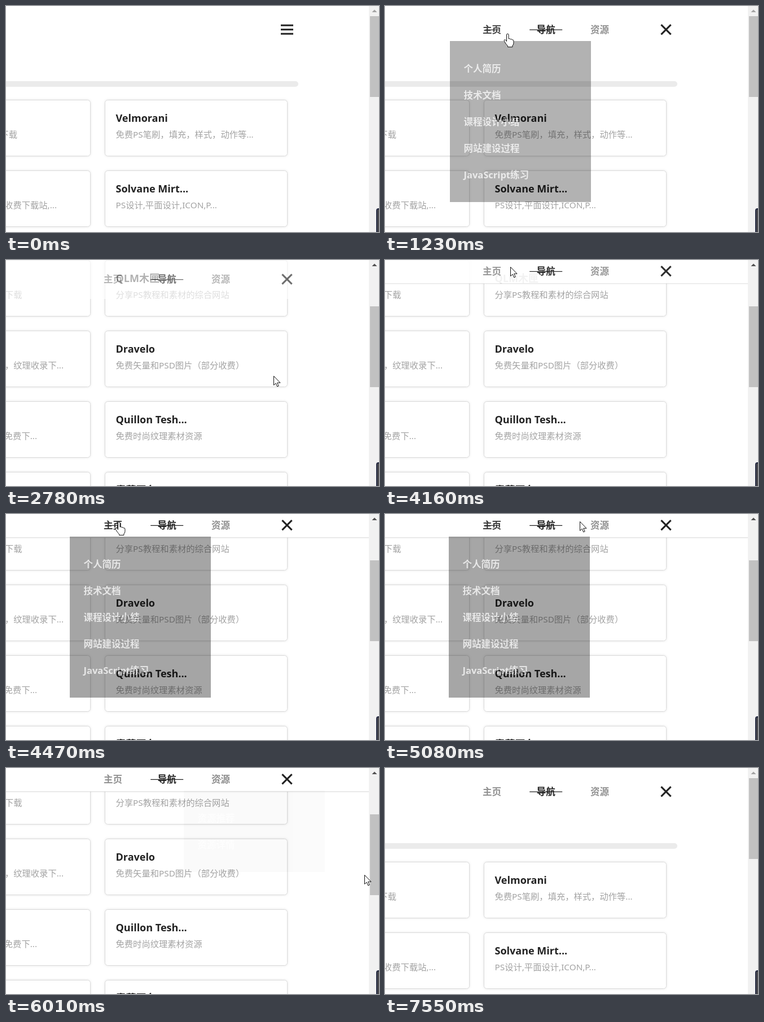
An HTML page for the animation above (8180 ms loop, 661 px wide and 400 px high).

```html
<!DOCTYPE html>
<html lang="zh-CN">
<head>
<meta charset="utf-8">
<style>
  html, body { margin: 0; width: 100%; height: 100%; overflow: hidden; background: #fff; }
  svg { display: block; font-family: "Noto Sans", "Noto Sans CJK SC", "Noto Sans CJK", sans-serif; }
  .card { fill: #fff; stroke: #dadada; filter: drop-shadow(0 0 2px rgba(0, 0, 0, .1)); }
  .title { font-size: 18px; font-weight: 700; fill: #222; }
  .desc { font-size: 15.3px; fill: #a3a3a3; }
  .nav, .menu text { font-size: 16.5px; font-weight: 700; }
  .nav { text-anchor: middle; }
  #bars path { stroke: #222; stroke-width: 3; }
  .line { stroke: #222; stroke-width: 1.2; }
  #cursor path { fill: #fff; stroke: #111; stroke-linejoin: round; }
</style>
</head>
<body>
<svg id="stage" width="661" height="400" viewBox="0 0 661 400">
  <g id="page"><rect x="-20" y="133" width="538" height="10" rx="5" fill="#ebebeb"/></g>
  <g id="header">
    <rect id="bg" width="643" fill="#fff"/>
    <g id="edge">
      <path d="M0 41.5H643" stroke="#e2e2e2"/>
      <path d="M0 42.5H643" stroke="#000" stroke-opacity=".04"/>
      <path d="M0 43.5H643" stroke="#000" stroke-opacity=".02"/>
    </g>
    <g id="bar">
      <g id="items"></g>
      <g id="bars"><path/><path/><path/></g>
    </g>
  </g>
  <g id="menus"></g>
  <rect x="643" width="18" height="400" fill="#f1f1f1"/>
  <path id="up" d="M648.5 11L653 6.5L657.5 11Z"/>
  <rect id="thumb" x="645" width="16" height="143" fill="#c1c1c1"/>
  <rect x="657" y="359" width="12" height="46" rx="3" fill="#4a4a4f" stroke="#262b42" stroke-width="2"/>
  <g id="cursor">
    <path d="M0 0V16L3.7 12.7L6.2 18.5L8.7 17.4L6.2 11.8H11.5Z"/>
    <path d="M-2 13V1.5a1.8 1.8 0 0 1 3.6 0V8.5q2-1 3.2 .8q2-.8 3 .9q2.4-.4 2.6 2V16q0 3-2 4.5V23H0v-2q-3-2.5-6-8q-1.2-3 1-3q1.5 .5 3 3z"/>
  </g>
</svg>
<script>
const LOOP = 8180, SCROLL = 416;
const $ = id => document.getElementById(id);
const set = (el, attrs) => { for (const k in attrs) el.setAttribute(k, attrs[k]); };

// left description, its right edge, title, description
const cards = [
  ['笔刷素材下载', 20, 'Velmorani', '免费PS笔刷，填充，样式，动作等...'],
  ['素材收费下载站,...', 90, 'Solvane Mirt...', 'PS设计,平面设计,ICON,P...'],
  ['素材下载', 28.5, 'QLM木匣', '分享PS教程和素材的综合网站'],
  ['图案，纹理收录下...', 102, 'Dravelo', '免费矢量和PSD图片（部分收费）'],
  ['素材免费下...', 55, 'Quillon Tesh...', '免费时尚纹理素材资源'],
  ['', 0, '青荷图台', '']
];
$('page').innerHTML += cards.map(([left, end, title, desc], i) => `
  <g transform="translate(0 ${166 + 125 * i})">
    <rect class="card" x="-173.5" y=".5" width="323" height="99" rx="5"/>
    <rect class="card" x="175.5" y=".5" width="323" height="99" rx="5"/>
    <text class="desc" x="${end}" y="67" text-anchor="end">${left}</text>
    <text class="title" x="194.5" y="39">${title}</text>
    <text class="desc" x="194.5" y="67">${desc}</text>
  </g>`).join('');

const navs = [['主页', 189.5], ['导航', 285.2], ['资源', 380.5]];
$('items').innerHTML = navs.map(([name, x]) => `
  <g transform="translate(${x} 0)"><text class="nav" y="6">${name}</text><path class="line"/></g>`).join('');

const menus = [
  ['个人简历', '技术文档', '课程设计小结', '网站建设过程', 'JavaScript练习'],
  ['资源推荐', '资源详情']
];
$('menus').innerHTML = menus.map(list => `
  <g class="menu"><rect width="250" height="${50 + 47 * list.length}" fill="#000" fill-opacity=".75"/>
  ${list.map((s, i) => `<text x="24.5" y="${55 + 47 * i}">${s}</text>`).join('')}</g>`).join('');

const path = [
  [70, 541, 258], [420, 541, 40], [880, 541, 40], [1230, 217, 49], [1380, 206, 49],
  [1700, 206, 49], [1930, 195, 201], [2080, 195, 201], [2390, 474, 205], [3240, 474, 205],
  [4160, 222, 12], [4310, 222, 12], [4400, 200, 14], [4760, 200, 14], [5080, 345, 13],
  [5250, 375, 14], [5500, 385, 20], [6010, 635, 189], [6310, 609, 177], [7090, 609, 177], [7550, 571, 361]
];
const handTimes = [[400, 900], [1180, 2090], [4330, 4900], [5160, 5560]];

function cursorAt(t) {
  const i = Math.max(1, path.findIndex(p => p[0] >= t));
  const [t0, x0, y0] = path[i - 1], [t1, x1, y1] = path[i];
  const k = Math.min(1, Math.max(0, (t - t0) / (t1 - t0)));
  return [x0 + (x1 - x0) * k, y0 + (y1 - y0) * k];
}

function draw(t) {
  const ramp = (a, b) => Math.min(1, Math.max(0, (t - a) / (b - a)));
  const ease = (a, b) => 1 - (1 - ramp(a, b)) ** 2;
  const [cx, cy] = cursorAt(t);

  const scroll = ease(2600, 2760) - ease(6460, 6620);
  set($('page'), { transform: `translate(0 ${-Math.round(SCROLL * scroll)})` });
  set($('thumb'), { y: 18 + 64 * scroll });
  set($('up'), { fill: scroll > 0 ? '#505050' : '#a3a3a3' });

  // header shrinks and hides on scrolling down, returns on hover
  const compact = ramp(2620, 3080) - ramp(6480, 6940);
  const shown = ramp(3500, 4200);
  const mid = 41.7 - 21.9 * compact;
  set($('header'), { opacity: 1 - ramp(2620, 3080) + shown });
  set($('bg'), { height: 84 - 43 * compact });
  set($('edge'), { opacity: shown - ramp(6480, 6700) });
  set($('bar'), { transform: `translate(0 ${mid})` });

  // burger turns into a cross, items slide in
  const open = ease(430, 900);
  const arm = 11 + 1.2 * open;
  [-1, 0, 1].forEach((s, i) => set($('bars').children[i], {
    d: `M${-arm} 0H${arm}`,
    transform: `translate(498 ${s * 7.5 * (1 - open)}) rotate(${-45 * s * open})`,
    opacity: s ? 1 : 1 - open
  }));
  set($('items'), { transform: `translate(${60 * (1 - open)} 0)`, opacity: open });

  const first = ramp(1110, 1410) - ramp(2080, 2390) + ramp(4330, 4630) - ramp(4920, 5220);
  const second = ramp(5150, 5450) - ramp(5720, 6018);
  [first, 1, second].forEach((p, i) => {
    const [text, line] = $('items').children[i].children;
    const grey = 145 - 111 * Math.min(1, p * 1.7);
    const half = 29 * (i === 1 ? open : p);
    set(text, { fill: `rgb(${grey},${grey},${grey})` });
    set(line, { d: `M${-half} .5H${half}`, opacity: half > 0 ? 1 : 0 });
  });

  [first, second].forEach((p, i) => {
    const menu = $('menus').children[i];
    const x = 99 + 191 * i + 26 * (1 - p), y = mid + 20.3;
    set(menu, { transform: `translate(${Math.round(x)} ${Math.round(y)})`, opacity: p });
    menu.querySelectorAll('text').forEach((el, n) => {
      const over = cx > x && cx < x + 250 && Math.abs(cy - y - 49 - 47 * n) < 23;
      set(el, { fill: over ? '#fff' : '#cecece' });
    });
  });

  const hand = handTimes.some(([a, b]) => t >= a && t < b);
  set($('cursor'), {
    transform: `translate(${Math.round(cx) + .5} ${Math.round(cy) + .5})`,
    visibility: t >= 70 && t < 7550 ? 'visible' : 'hidden'
  });
  set($('cursor').children[0], { opacity: hand ? 0 : 1 });
  set($('cursor').children[1], { opacity: hand ? 1 : 0 });
}

const start = performance.now();
function tick() {
  draw((performance.now() - start) % LOOP);
  requestAnimationFrame(tick);
}
tick();
</script>
</body>
</html>
```
